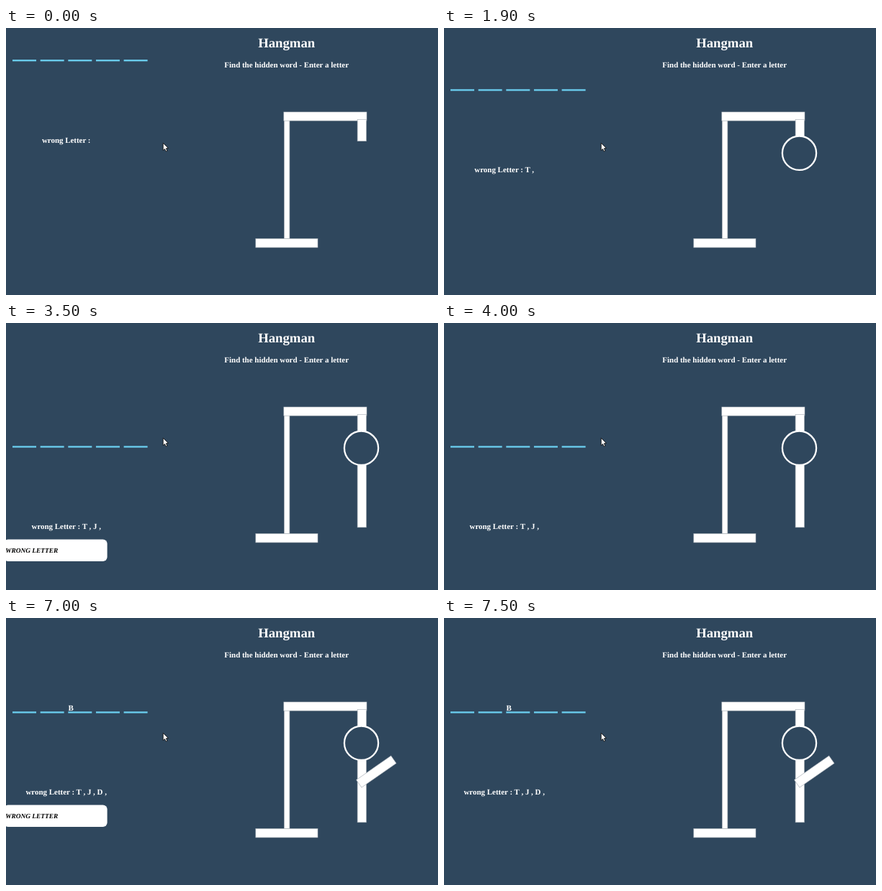
These frames come from a looping animation (600 by 372 pixels, 8000 ms). An HTML page:

```html
<!DOCTYPE html>
<html lang="en">
<head>
<meta charset="utf-8">
<title>Hangman</title>
<style>
  html, body { margin: 0; width: 100%; height: 100%; overflow: hidden; background: #2f475d; }
  svg { display: block; width: 600px; height: 372px; }
  text { font: bold 10.95px "Liberation Serif", "Times New Roman", serif; fill: #fff; text-rendering: geometricPrecision; }
  .mid { text-anchor: middle; }
  .title { font-size: 18.72px; }
  .note { font-size: 9.36px; font-style: italic; fill: #000; }
  .wood rect { fill: #fff; stroke: #a3abb2; stroke-width: .6; }
</style>
</head>
<body>
<svg viewBox="0 0 600 372">
  <rect width="600" height="372" fill="#2f475d"/>
  <text class="mid title" x="389.7" y="27">Hangman</text>
  <text class="mid" x="389.7" y="54.8">Find the hidden word - Enter a letter</text>

  <g class="wood">
    <rect x="386.3" y="128" width="7.6" height="165.5"/>
    <rect x="385.8" y="117" width="115.2" height="12.2"/>
    <rect x="346.8" y="293.4" width="86.2" height="12.5"/>
    <rect x="488.1" y="127.3" width="12.3" height="30.4"/>
    <rect id="body" x="488.1" y="190" width="12.3" height="94.8"/>
    <rect id="arm" x="-29.4" y="-6.4" width="58.8" height="12.8" transform="translate(514.3 214) rotate(-35)"/>
  </g>
  <circle id="head" cx="493.5" cy="174.3" r="23.6" fill="#2f475d" stroke="#fff" stroke-width="2.3"/>

  <!-- left panel, moved as one block -->
  <g id="panel">
    <g id="slots" fill="#6bcff0"></g>
    <text id="found" x="86.4" y="84.2">B</text>
    <text id="wrong" class="mid" x="83.7" y="201.2"></text>
    <g id="alert">
      <rect x="-3" y="215.4" width="143.6" height="30.7" rx="6" fill="#fff"/>
      <text class="note" x="-0.8" y="233.8">WRONG LETTER</text>
    </g>
  </g>

  <path d="M218.2 160.2V170.6L220.5 168.5L222.1 172L223.9 171.2L222.4 167.8L225.4 167.5Z"
        fill="#fff" stroke="#111" stroke-width=".9" stroke-linejoin="round"/>
</svg>
<script>
  const LOOP = 8000;
  const $ = id => document.getElementById(id);

  // start ms, panel offset, wrong letters, alert, found letter
  const steps = [
    [0, -41.2, "", false, false],
    [1300, 0, "T", true, false],
    [1900, 0, "T", false, false],
    [3500, 86, "TJ", true, false],
    [4000, 86, "TJ", false, false],
    [5300, 86, "TJ", false, true],
    [7000, 45, "TJD", true, true],
    [7500, 45, "TJD", false, true]
  ];

  for (let i = 0; i < 5; i++) {
    const slot = document.createElementNS("http://www.w3.org/2000/svg", "rect");
    const box = { x: 9 + i * 38.65, y: 85.3, width: 33, height: 2.3 };
    for (const key in box) slot.setAttribute(key, box[key]);
    $("slots").append(slot);
  }

  const show = (id, on) => $(id).setAttribute("visibility", on ? "visible" : "hidden");

  let current;
  function draw(now) {
    const t = now % LOOP;
    const step = steps.findLast(s => s[0] <= t);
    if (step !== current) {
      current = step;
      const [, shift, letters, alert, found] = step;
      $("panel").setAttribute("transform", `translate(0 ${shift})`);
      $("wrong").textContent = "wrong Letter :" + [...letters].map(c => ` ${c} ,`).join("");
      show("alert", alert);
      show("found", found);
      ["head", "body", "arm"].forEach((part, i) => show(part, letters.length > i));
    }
  }

  const start = performance.now();
  function tick() {
    draw(performance.now() - start);
    requestAnimationFrame(tick);
  }
  tick();
</script>
</body>
</html>
```
